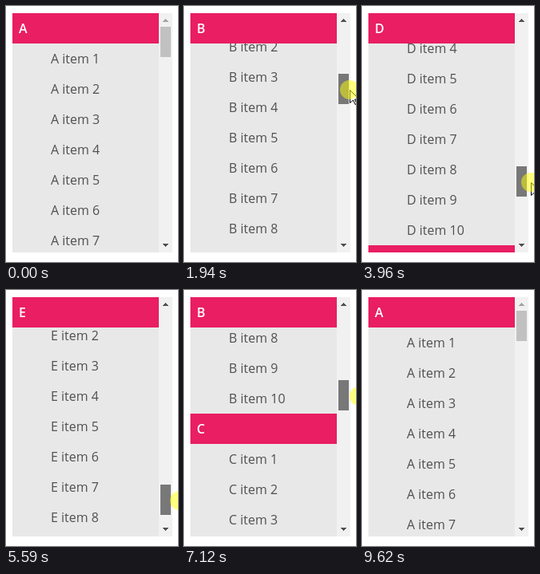
Recreate the animation shown at these times as an HTML page. Size 215x321 px, loop 9930 ms.

```html
<!DOCTYPE html>
<html lang="en">
<head>
<meta charset="utf-8">
<title>Sticky headings</title>
<style>
  html, body { margin: 0; width: 100%; height: 100%; overflow: hidden; background: #fff; }
  #list {
    position: absolute; left: 8px; top: 9px; width: 183px; height: 300px;
    overflow: hidden; background: #e8e8e8; color: #505050;
    font: 16px/38px "Open Sans", sans-serif;
  }
  h2, p { margin: 0; height: 38px; font: inherit; white-space: pre; }
  h2 { position: sticky; top: 0; padding-left: 8px; background: #e91e63; color: #fff; font-weight: 600; }
  p { padding-left: 48px; }
  svg { position: absolute; left: 0; top: 0; }
</style>
</head>
<body>
<div id="list"></div>
<svg width="215" height="321">
  <g shape-rendering="crispEdges">
    <path fill="#f1f1f1" d="M191 9h17v300h-17z"/>
    <path id="up" d="M196 20l3.5-4 3.5 4z"/>
    <path id="down" d="M196 298h7l-3.5 4z"/>
    <rect id="thumb" x="193" width="13" height="38"/>
  </g>
  <g id="pointer">
    <path d="M.5.5V16.5L4.5 13 7 18.5 9 17.5 6.5 12H12z" fill="#fff" stroke="#000"/>
    <circle id="halo" r="12" fill="#ff0" fill-opacity=".5"/>
  </g>
</svg>
<script>
const LOOP = 9930, MAX_SCROLL = 1790, TRAVEL = 228, GRAB_Y = 45;
const ENTER = 80, PRESS = 770, RELEASE = 8910;
const $ = id => document.getElementById(id);

$('list').innerHTML = [...'ABCDE'].map(letter =>
  `<section><h2>${letter}</h2>` +
  Array.from({ length: 10 }, (_, i) => `<p>${letter} item ${i + 1}</p>`).join('') +
  '</section>').join('');

const linear = u => u;
const soft = u => u + (u * u * (3 - 2 * u) - u) / 3;
const slowing = u => 1 - (1 - u) ** 1.5;

// The pointer rests at each destination until the next move begins.
const home = { x: 214, y: 297 };
const moves = [
  { begin: ENTER, end: 740, x: 205, y: GRAB_Y, ease: slowing },
  { begin: 970, end: 3500, x: 210, y: GRAB_Y + 165, ease: soft },
  { begin: 3780, end: 5260, x: 217, y: GRAB_Y + TRAVEL, ease: slowing },
  { begin: 5440, end: 8250, x: 220, y: GRAB_Y, ease: soft },
  { begin: 8250, end: 8680, x: 220, y: 22, ease: linear },
  { begin: 9339, end: 9340, x: 212, y: 272, ease: Math.floor },
  { begin: 9340, end: 9620, x: 207, y: 322, ease: linear }
];

function pointerAt(t) {
  let { x, y } = home;
  for (const move of moves) {
    const u = Math.max(0, Math.min(1, (t - move.begin) / (move.end - move.begin)));
    x += (move.x - x) * move.ease(u);
    y += (move.y - y) * move.ease(u);
  }
  return { x: Math.round(x), y: Math.round(y) };
}

const arrowColor = enabled => enabled ? '#505050' : '#a3a3a3';
const visibility = shown => shown ? 'visible' : 'hidden';

function draw(now) {
  const t = now % LOOP;
  const { x, y } = pointerAt(t);
  const pressed = t >= PRESS && t < RELEASE;
  const hovered = t < PRESS && x >= 193 && y < 64;
  const drag = pressed ? Math.max(0, Math.min(TRAVEL, y - GRAB_Y)) : 0;
  const scroll = Math.floor(drag * MAX_SCROLL / TRAVEL);

  $('list').scrollTop = scroll;
  $('thumb').setAttribute('y', 26 + Math.floor(scroll * TRAVEL / MAX_SCROLL));
  $('thumb').setAttribute('fill', pressed ? '#787878' : hovered ? '#a8a8a8' : '#c1c1c1');
  $('up').setAttribute('fill', arrowColor(scroll > 0));
  $('down').setAttribute('fill', arrowColor(scroll < MAX_SCROLL));
  $('halo').setAttribute('display', pressed ? 'inline' : 'none');
  $('pointer').setAttribute('visibility', visibility(t >= ENTER));
  $('pointer').setAttribute('transform', `translate(${x} ${y})`);
}

const start = performance.now();
function tick() {
  draw(performance.now() - start);
  requestAnimationFrame(tick);
}
tick();
</script>
</body>
</html>
```
